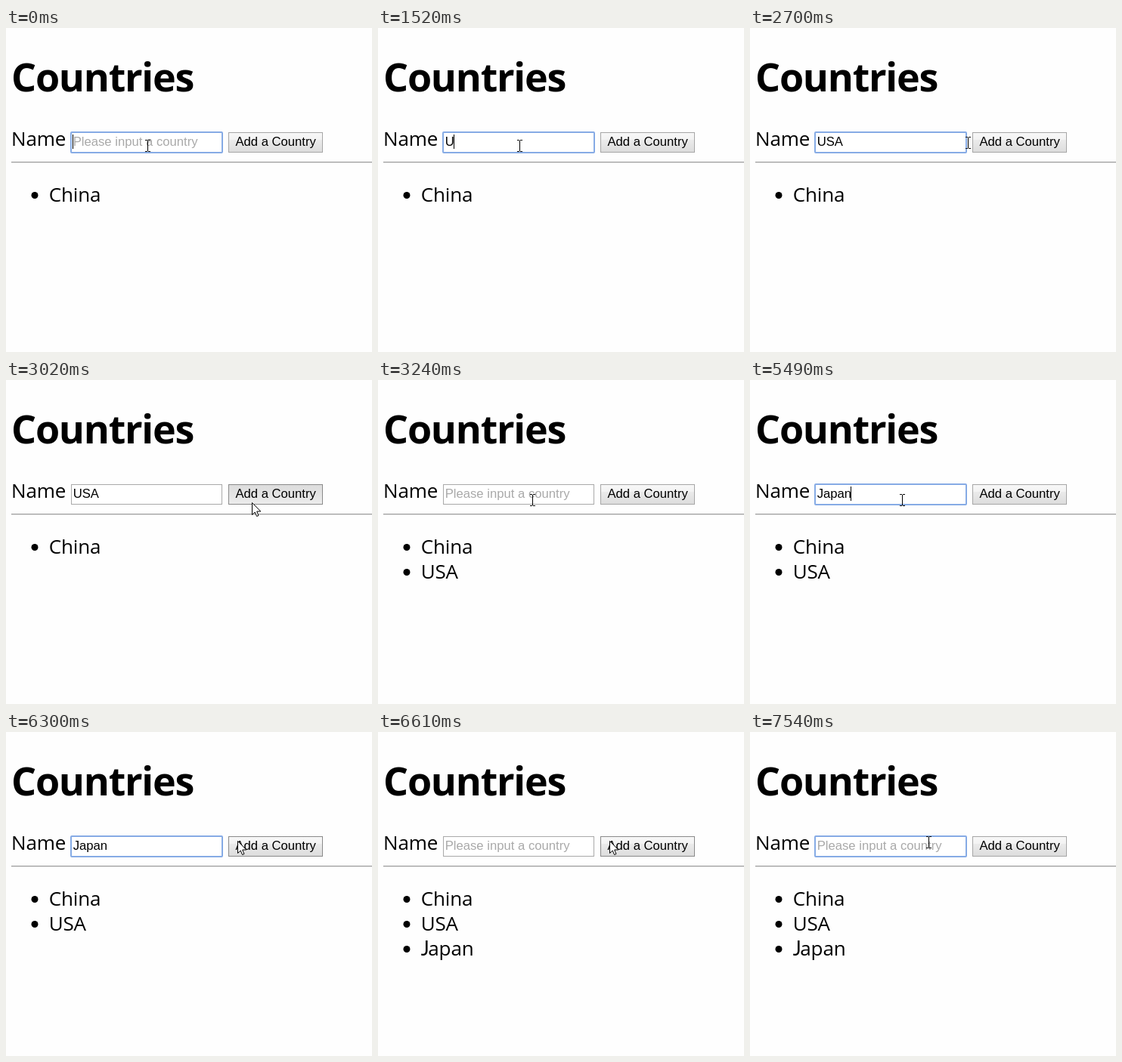
Write an HTML page that moves like this. It is 484 px wide and 429 px high and loops after 8000 ms.

```html
<!DOCTYPE html>
<html lang="en">
<head>
<meta charset="utf-8">
<title>Countries</title>
<style>
html, body { margin: 0; width: 100%; height: 100%; overflow: hidden; background: #fefefe; }
svg { display: block; width: 484px; height: 429px; }
text { white-space: pre; }
.page { font: 26px "Open Sans", "Noto Sans", sans-serif; letter-spacing: -.15px; }
.title { font-size: 52px; font-weight: 700; letter-spacing: -1.25px; }
.form { font: 16.67px "Liberation Sans", Arial, sans-serif; }
.crisp { shape-rendering: crispEdges; }
</style>
</head>
<body>
<svg viewBox="0 0 484 429">
  <defs>
    <linearGradient id="face" x2="0" y2="1">
      <stop stop-color="#f7f7f7"/><stop offset=".36" stop-color="#f3f3f3"/>
      <stop offset=".36" stop-color="#ebebeb"/><stop offset="1" stop-color="#dcdcdc"/>
    </linearGradient>
    <linearGradient id="pressed" x2="0" y2="1">
      <stop stop-color="#dcdcdc"/><stop offset="1" stop-color="#ececec"/>
    </linearGradient>
  </defs>
  <g class="page">
    <text class="title" x="7" y="84">Countries</text>
    <text x="7" y="156">Name</text>
    <g class="item"><circle cx="38" cy="221.5" r="4.5"/><text x="56.7" y="230">China</text></g>
    <g class="item"><circle cx="38" cy="254.5" r="4.5"/><text x="56.7" y="263">USA</text></g>
    <g class="item"><circle cx="38" cy="287.5" r="4.5"/><text x="56.7" y="296"><tspan font-family="Lato, sans-serif">J</tspan><tspan x="66.3">apan</tspan></text></g>
  </g>
  <g class="crisp">
    <rect x="7" y="177" width="477" height="1" fill="#9a9a9a"/>
    <rect x="7" y="178" width="477" height="1" fill="#e6e6e6"/>
    <rect x="86.5" y="138.5" width="199" height="26" fill="#fff" stroke="#a9a9a9"/>
    <rect id="button" x="294.5" y="138.5" width="124" height="26"/>
  </g>
  <rect id="ring" x="86" y="138" width="200" height="27" rx="1" fill="none" stroke="#86abe5" stroke-width="2"/>
  <g class="form">
    <text id="value" x="88.7" y="156"></text>
    <text x="303.4" y="156">Add a Country</text>
  </g>
  <rect id="caret" class="crisp" y="141" width="1" height="19"/>
  <path id="beam" class="crisp" fill="none" stroke="#000" d="M-3 -7.5h3M1 -7.5h3M.5 -7V7M-3 7.5h3M1 7.5h3"/>
  <path id="arrow" fill="#fff" stroke="#000" d="M.5 .5V16.5L4.2 13L6.6 18.5L9 17.5L6.7 12H11.8Z"/>
</svg>
<script>
const LOOP = 8000, BLINK = 530;
const $ = id => document.getElementById(id);
const items = document.querySelectorAll('.item');

// time, text, list length, start of caret blinking (null = no focus)
const states = [
  [0, '', 1, -440], [1520, 'U', 1, 1520], [1740, 'US', 1, 1740], [1920, 'USA', 1, 1910],
  [2930, 'USA', 1, null], [3040, '', 2, null], [3420, '', 2, 3420],
  [4350, 'J', 2, 4350], [4860, 'Ja', 2, 4860], [5280, 'Jap', 2, 5280],
  [5390, 'Japa', 2, 5390], [5490, 'Japan', 2, 5490],
  [6490, 'Japan', 2, null], [6610, '', 3, null], [7020, '', 3, 7010]
];

// first step, last step, number of steps, end point
const moves = [
  [2350, 2440, 3, 193, 156], [2590, 2700, 5, 288, 152], [2727, 2780, 3, 325, 162],
  [3110, 3240, 5, 204, 159], [3310, 3310, 1, 201, 159],
  [6170, 6300, 6, 306, 144], [6760, 6870, 5, 232, 145], [7020, 7100, 2, 236, 146]
];

function pointer(t) {
  let x = 187, y = 156;
  for (const [start, end, steps, toX, toY] of moves) {
    if (t < start) break;
    const gap = (end - start) / (steps - 1) || 1;
    const part = Math.min(steps, Math.floor((t - start) / gap) + 1) / steps;
    x += (toX - x) * part;
    y += (toY - y) * part;
  }
  return [Math.round(x), Math.round(y)];
}

function show(el, on) {
  el.style.display = on ? '' : 'none';
}

function draw(t) {
  const [, text, count, blink] = states.findLast(s => s[0] <= t);
  const focused = blink !== null;
  const value = $('value');
  const label = text || 'Please input a country';
  if (value.textContent !== label) value.textContent = label;
  value.setAttribute('fill', text ? '#000' : '#a9a9a9');
  items.forEach((item, i) => show(item, i < count));
  show($('ring'), focused);

  show($('caret'), focused && Math.floor((t - blink) / BLINK) % 2 === 0);
  $('caret').setAttribute('x', 88 + (text ? Math.floor(value.getComputedTextLength()) : 0));

  const [x, y] = pointer(t);
  const onButton = x >= 294, down = !focused && text !== '';
  $('button').setAttribute('fill', down ? 'url(#pressed)' : 'url(#face)');
  $('button').setAttribute('stroke', onButton ? '#8a8a8a' : '#a6a6a6');
  for (const id of ['beam', 'arrow']) {
    show($(id), (id === 'arrow') === (x >= 290));
    $(id).setAttribute('transform', `translate(${x} ${y})`);
  }
}

function frame() {
  draw(performance.now() % LOOP);
  requestAnimationFrame(frame);
}
frame();
</script>
</body>
</html>
```
